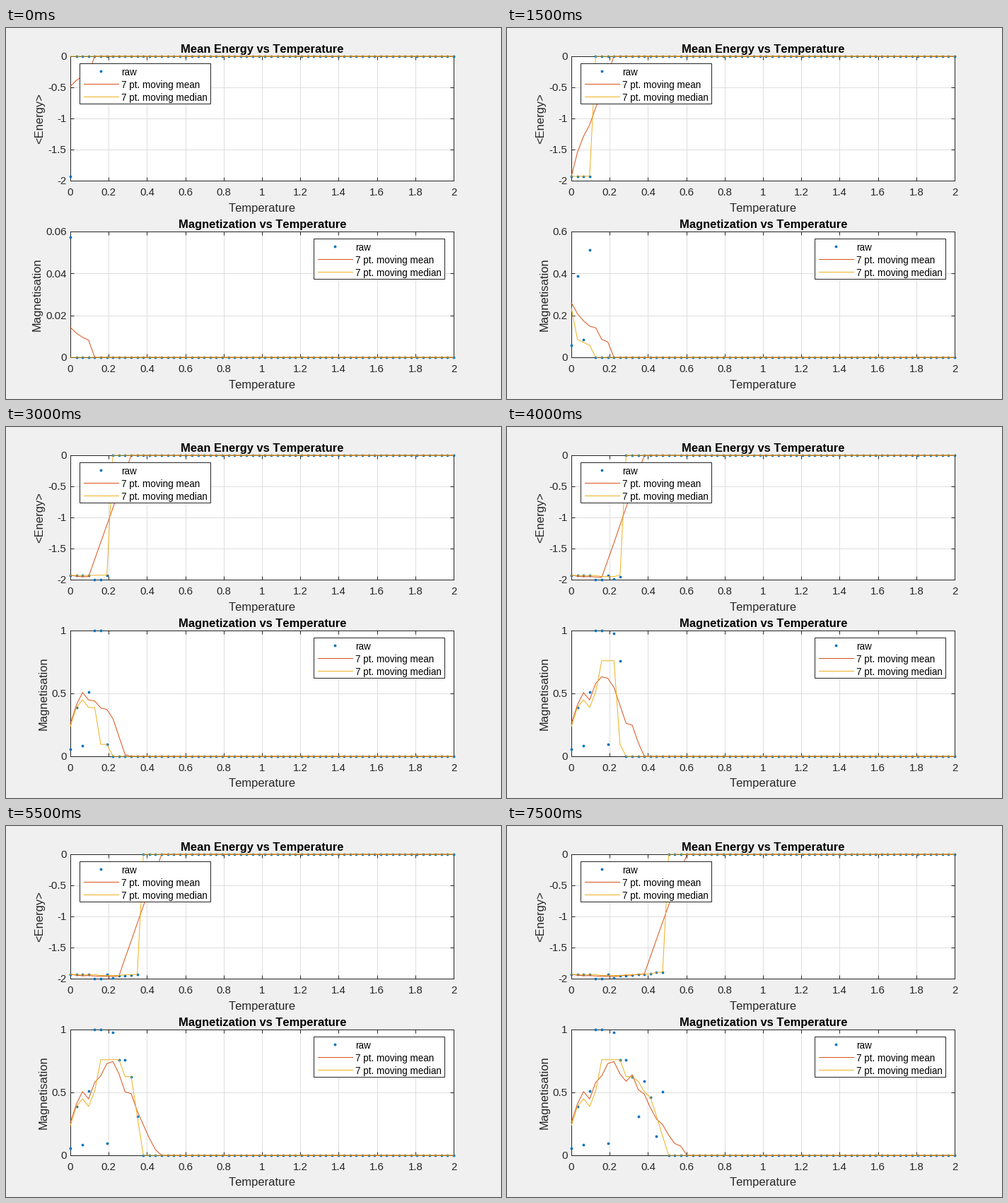
Recreate the animation shown at these times as a matplotlib script. Size 700x525 px, loop 8000 ms.

```python
import numpy as np
import matplotlib.pyplot as plt
from matplotlib.animation import FuncAnimation
from matplotlib.patches import Rectangle

W, H, DPI = 700, 525, 100
PT = 72 / DPI  # points per pixel
BLUE, ORANGE, GOLD, INK = "#0072BD", "#D95319", "#EDB120", "#262626"
LEFT, RIGHT = 91, 633
TOP_BOX, LOW_BOX = (40, 216), (288, 466)

N, FRAMES = 64, 16
temp = np.linspace(0, 2, N)
energy = np.array([-1.935, -1.933, -1.93, -1.927, -2, -2, -1.928, -1.985,
                   -1.95, -1.95, -1.938, -1.93, -1.93, -1.922, -1.893, -1.9])
magnet = np.array([0.0573, 0.388, 0.085, 0.511, 1, 1, 0.095, 0.977,
                   0.76, 0.76, 0.625, 0.311, 0.588, 0.461, 0.152, 0.505])
SCALES = [(0.06, 0.02), (0.4, 0.1), (0.6, 0.2), (1, 0.5)]  # upper limit, tick step

plt.rcParams.update({"font.family": "Liberation Sans", "text.kerning_factor": 6})
fig = plt.figure(figsize=(W / DPI, H / DPI), dpi=DPI, facecolor="#F0F0F0")

# overlay in pixel coordinates for text and legends
page = fig.add_axes([0, 0, 1, 1], zorder=5)
page.set(xlim=(0, W), ylim=(H, 0))
page.axis("off")


def write(x, y, s, px, ha="center", color=INK, **kw):
    return page.text(x, y, s, fontsize=px * PT, ha=ha, va="baseline",
                     color=color, **kw)


def side_label(x, box, s):
    return write(x, sum(box) / 2, s, 16.5, rotation=90, rotation_mode="anchor")


def add_series(ax, **kw):
    raw, = ax.plot([], [], "o", color=BLUE, ms=3.8 * PT, mew=0, **kw)
    mean, = ax.plot([], [], color=ORANGE, lw=PT, **kw)
    median, = ax.plot([], [], color=GOLD, lw=PT, **kw)
    return raw, mean, median


def make_plot(box, title):
    top, bottom = box
    ax = fig.add_axes([LEFT / W, 1 - bottom / H, (RIGHT - LEFT) / W, (bottom - top) / H])
    ax.set(xlim=(0, 2), xticks=np.linspace(0, 2, 11), axisbelow=True)
    ax.tick_params(direction="in", top=True, right=True, length=5.4 * PT, width=PT,
                   color=INK, labelbottom=False, labelleft=False)
    ax.grid(color="#DEDEDE", lw=PT)
    for spine in ax.spines.values():
        spine.set(color=INK, linewidth=PT)
    for t in np.linspace(0, 2, 11):
        write(LEFT + t / 2 * (RIGHT - LEFT), bottom + 21, f"{t:.2g}", 15)
    write(362.5, top - 5, title, 16.5, color="black", weight="bold")
    return ax, add_series(ax, zorder=3, clip_on=False, snap=False)


def y_label(value, lo, hi, box):
    y = box[1] - (value - lo) / (hi - lo) * (box[1] - box[0])
    return write(85.5, y + 5.2, f"{value:.2g}", 15, ha="right")


def legend(x, y):
    page.add_patch(Rectangle((x, y), 185, 57, fc="white", ec=INK, lw=PT, zorder=4))
    raw, mean, median = add_series(page, zorder=5)
    raw.set_data([x + 29.8], [y + 10.8])
    mean.set_data([x + 6, x + 55], [y + 29.2] * 2)
    median.set_data([x + 6, x + 55], [y + 47] * 2)
    names = "raw", "7 pt. moving mean", "7 pt. moving median"
    for i, name in enumerate(names):
        write(x + 58.7, y + 17 + 18 * i, name, 13.5, ha="left", color="black", zorder=6)


def moving(f, v, half=3):
    return [f(v[max(0, i - half):i + half + 1]) for i in range(len(v))]


def fill(series, values, count):
    v = np.zeros(N)
    v[:count] = values[:count]
    for line, data in zip(series, (v, moving(np.mean, v), moving(np.median, v))):
        line.set_data(temp, data)


e_ax, e_series = make_plot(TOP_BOX, "Mean Energy vs Temperature")
m_ax, m_series = make_plot(LOW_BOX, "Magnetization vs Temperature")
e_ax.set(ylim=(-2, 0), yticks=np.linspace(-2, 0, 5))
for v in np.linspace(-2, 0, 5):
    y_label(v, -2, 0, TOP_BOX)
side_label(52, TOP_BOX, "<Energy>")
m_name = side_label(49, LOW_BOX, "Magnetisation")
write(362.5, 260, "Temperature", 16.5)
m_temp = write(362.5, 510, "Temperature", 16.5)
legend(104, 50)
legend(435, 298)
m_labels = []


def draw(i):
    count = i + 1
    fill(e_series, energy, count)
    fill(m_series, magnet, count)
    top, step = next(s for s in SCALES if s[0] >= magnet[:count].max())
    ticks = np.arange(round(top / step) + 1) * step
    m_ax.set(ylim=(0, top), yticks=ticks)
    while m_labels:
        m_labels.pop().remove()
    m_labels.extend(y_label(v, 0, top, LOW_BOX) for v in ticks)
    m_name.set_x(49 if top < 0.1 else 58)
    m_temp.set_y(509 if top == 1 else 510)
    return []


anim = FuncAnimation(fig, draw, frames=FRAMES, interval=500, repeat=True,
                     repeat_delay=0, blit=False)
plt.show()
```
